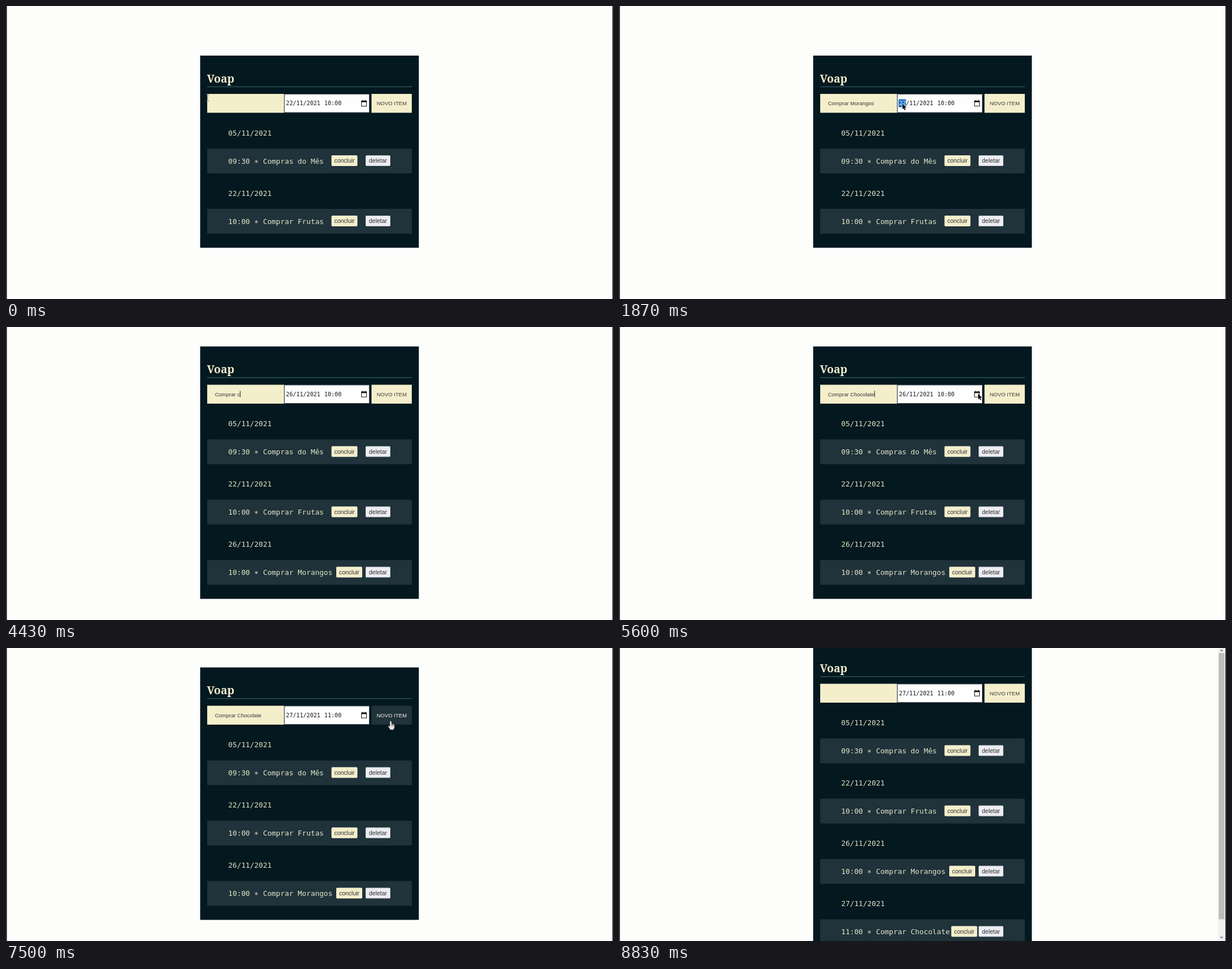
Recreate the animation shown at these times as an HTML page with a canvas. Size 1077 by 520 pixels, loop 8860 ms.

```html
<!DOCTYPE html>
<html lang="pt-BR">
<head>
<meta charset="utf-8">
<title>Lista de tarefas</title>
<style>
  html, body { margin: 0; width: 100%; height: 100%; overflow: hidden; background: #fdfdfc; }
  canvas { display: block; width: 1077px; height: 520px; }
</style>
</head>
<body>
<canvas id="stage"></canvas>
<script>
const W = 1077, H = 520, LOOP = 8860;
const ADD1 = 3150, ADD2 = 7750;
const canvas = document.getElementById('stage');
const ctx = canvas.getContext('2d');
const dpr = window.devicePixelRatio || 1;
canvas.width = W * dpr;
canvas.height = H * dpr;

const SANS = '"Liberation Sans", Arial, sans-serif';
const MONO = '"DejaVu Sans Mono", monospace';
const SERIF = '"Noto Serif", serif';
const CREAM = '#f4eecb', LIGHT = '#e2e6c6', DARK = '#04181f', ROW = '#20323a';

// date, entry, x of the first button
const items = [
  ['05/11/2021', '09:30 ∗ Compras do Mês', 577.5],
  ['22/11/2021', '10:00 ∗ Comprar Frutas', 577.5],
  ['26/11/2021', '10:00 ∗ Comprar Morangos', 586],
  ['27/11/2021', '11:00 ∗ Comprar Chocolate', 589.5]
];

// start, gap between keys, keys ("<" deletes, "\n" submits)
const typing = [
  [350, 65, 'Coprar'],
  [830, 40, '<<<<mprar Morangos'],
  [ADD1, 0, '\n'],
  [3900, 60, 'Comprar c'],
  [4480, 85, '<Chocolate'],
  [ADD2, 0, '\n']
];

// time, x, y of the pointer
const path = [
  [0, 358, 163], [100, 358, 163], [450, 3, 299], [1500, 3, 299],
  [1790, 503, 173], [2400, 503, 173], [2750, 682.5, 183], [3200, 682.5, 183],
  [3700, 430, 120], [5280, 430, 120], [5550, 637, 118], [5750, 637, 118],
  [6000, 503, 120], [6900, 503, 120], [7350, 682.5, 129.5], [7820, 682.5, 129.5],
  [8100, 1095, 250]
];

const days = [[0, '22'], [2250, '26'], [6350, '27']];
const hours = [[0, '10'], [6800, '11']];
const selected = [[0, ''], [1850, 'day'], [ADD1, ''], [6020, 'day'], [6500, 'hour'], [7050, '']];
const carets = [[0, false], [300, true], [1850, false], [3800, true], [6020, false]];

function stepAt(list, t) {
  let value = list[0][1];
  for (const [start, v] of list) if (t >= start) value = v;
  return value;
}

function textAt(t) {
  let out = '';
  for (const [start, gap, keys] of typing) {
    [...keys].forEach((key, i) => {
      if (t < start + i * gap) return;
      out = key === '\n' ? '' : key === '<' ? out.slice(0, -1) : out + key;
    });
  }
  return out;
}

function pointerAt(t) {
  for (let i = 1; i < path.length; i++) {
    const [t0, x0, y0] = path[i - 1], [t1, x1, y1] = path[i];
    if (t < t1) {
      const p = (t - t0) / (t1 - t0), e = p * p * (3 - 2 * p);
      return { x: x0 + (x1 - x0) * e, y: y0 + (y1 - y0) * e };
    }
  }
  return { x: 1095, y: 250 };
}

function rect(x, y, w, h, color) {
  ctx.fillStyle = color;
  ctx.fillRect(x, y, w, h);
}

function text(str, x, y, font, color, align = 'left') {
  ctx.font = font;
  ctx.fillStyle = color;
  ctx.textAlign = align;
  ctx.fillText(str, x, y);
}

function button(label, x, y, w, fill, edge) {
  ctx.beginPath();
  ctx.roundRect(x + 0.5, y + 0.5, w - 1, 18, 1);
  ctx.fillStyle = fill;
  ctx.fill();
  ctx.strokeStyle = edge;
  ctx.lineWidth = 1;
  ctx.stroke();
  text(label, x + w / 2, y + 13, '10.5px ' + SANS, '#2b2f33', 'center');
}

function drawItem([date, entry, bx], y) {
  text(date, 394.3, y + 5, '12.8px ' + MONO, LIGHT);
  rect(357, y + 28.5, 363, 44, ROW);
  text(entry, 394.3, y + 55, '12.8px ' + MONO, LIGHT);
  button('concluir', bx, y + 40.5, 46, CREAM, '#f7f3d8');
  button('deletar', 638, y + 40.5, 44, '#ededf1', '#c9d0d8');
}

function drawDate(t, y) {
  rect(493.5, y, 151.5, 33.5, '#4d5860');
  rect(494.5, y + 1, 149.5, 31.5, '#fefefe');
  const mark = stepAt(selected, t), font = '10.1px ' + MONO;
  const part = (str, x, on) => {
    if (on) rect(x - 0.7, y + 9.5, 13, 14, '#0b6cc0');
    text(str, x, y + 20.2, font, on ? '#fff' : '#16181a');
  };
  part(stepAt(days, t), 496.8, mark === 'day');
  part('/11/2021', 509, false);
  part(stepAt(hours, t), 564.8, mark === 'hour');
  part(':00', 577, false);

  ctx.strokeStyle = '#16181a';
  ctx.lineWidth = 1.1;
  ctx.strokeRect(630.8, y + 12.8, 8.8, 9);
  rect(630.3, y + 12, 9.8, 2.8, '#16181a');
  rect(632, y + 11, 1.4, 2, '#16181a');
  rect(637, y + 11, 1.4, 2, '#16181a');
}

function drawInput(t, y) {
  rect(357, y, 136.5, 33.5, CREAM);
  const str = textAt(t), base = y + 20;
  text(str, 370.7, base, '9.5px ' + SANS, '#33363a');
  const end = 370.7 + ctx.measureText(str).width;
  if (str.startsWith('Copra')) rect(371, y + 22, end - 371, 1, '#cf5a4a');
  if (stepAt(carets, t)) rect(end, y + 11, 1, 11, '#222');
}

function shape(points, x, y, fill, edge) {
  ctx.beginPath();
  points.forEach(([px, py]) => ctx.lineTo(x + px, y + py));
  ctx.closePath();
  ctx.lineJoin = 'round';
  ctx.strokeStyle = edge;
  ctx.lineWidth = 1.4;
  ctx.stroke();
  ctx.fillStyle = fill;
  ctx.fill();
}

const ARROW = [[0, 0], [0, 10.5], [2.3, 8.4], [3.9, 12], [5.6, 11.2], [4, 7.8], [7, 7.6]];
const HAND = [[-1.2, 0.5], [0, 0], [1.2, 0.8], [1.5, 5], [6, 6], [7, 7.5], [6.6, 11.5],
  [5, 15.5], [-0.5, 15.5], [-4.5, 9.5], [-3.6, 8.4], [-1.2, 10]];

function drawPointer({ x, y }, kind) {
  if (kind === 'hand') {
    shape(HAND, x, y, '#e4e4e0', '#10181c');
    for (const dx of [1.7, 3.6, 5.3]) rect(x + dx, y + 6, 0.8, 3, '#30383c');
  } else if (kind === 'beam') {
    rect(x - 0.5, y - 5.5, 1, 11, '#8b979a');
    rect(x - 2.5, y - 6, 5, 1, '#8b979a');
    rect(x - 2.5, y + 5, 5, 1, '#8b979a');
  } else {
    shape(ARROW, x, y, '#111', '#fff');
  }
}

function drawScrollbar() {
  rect(1063, 0, 13, H, '#f1f1f1');
  rect(1064, 9, 10.5, 472.5, '#bdbdbd');
  for (const [y, d] of [[4, -1], [514, 1]]) {
    ctx.beginPath();
    ctx.moveTo(1066.5, y - d * 1.5);
    ctx.lineTo(1072, y - d * 1.5);
    ctx.lineTo(1069.2, y + d * 1.8);
    ctx.fillStyle = '#777';
    ctx.fill();
  }
}

function draw(t) {
  const count = 2 + (t >= ADD1) + (t >= ADD2);
  const top = [88, 34.5, -4.5][count - 2];
  const form = top + 68;
  const p = pointerAt(t);
  const over = (x, w) => p.x >= x && p.x <= x + w && p.y >= form && p.y <= form + 33.5;
  const hover = over(648.5, 71.5);

  ctx.setTransform(dpr, 0, 0, dpr, 0, 0);
  rect(0, 0, W, H, '#fdfdfc');
  rect(344.5, top, 388, 127 + count * 107, DARK);
  text('Voap', 356.5, top + 47.5, 'bold 19.5px ' + SERIF, '#f3efcf');
  rect(357, top + 54.8, 363, 1, '#3f6d70');

  drawInput(t, form);
  drawDate(t, form);
  rect(648.5, form, 71.5, 33.5, hover ? ROW : CREAM);
  text('NOVO ITEM', 684.4, form + 20, '9.5px ' + SANS, hover ? '#f4f4ee' : '#3a3d3c', 'center');
  items.slice(0, count).forEach((item, i) => drawItem(item, top + 136.5 + i * 107));

  if (count === 4) drawScrollbar();
  rect(0, 0, 1.5, H, '#111');
  rect(1076, 0, 1, H, '#111');

  const hidden = t > 3880 && t < 5280;
  if (!hidden) drawPointer(p, hover ? 'hand' : over(357, 136) ? 'beam' : 'arrow');
}

const begin = performance.now();
function tick() {
  draw((performance.now() - begin) % LOOP);
  requestAnimationFrame(tick);
}
tick();
</script>
</body>
</html>
```
